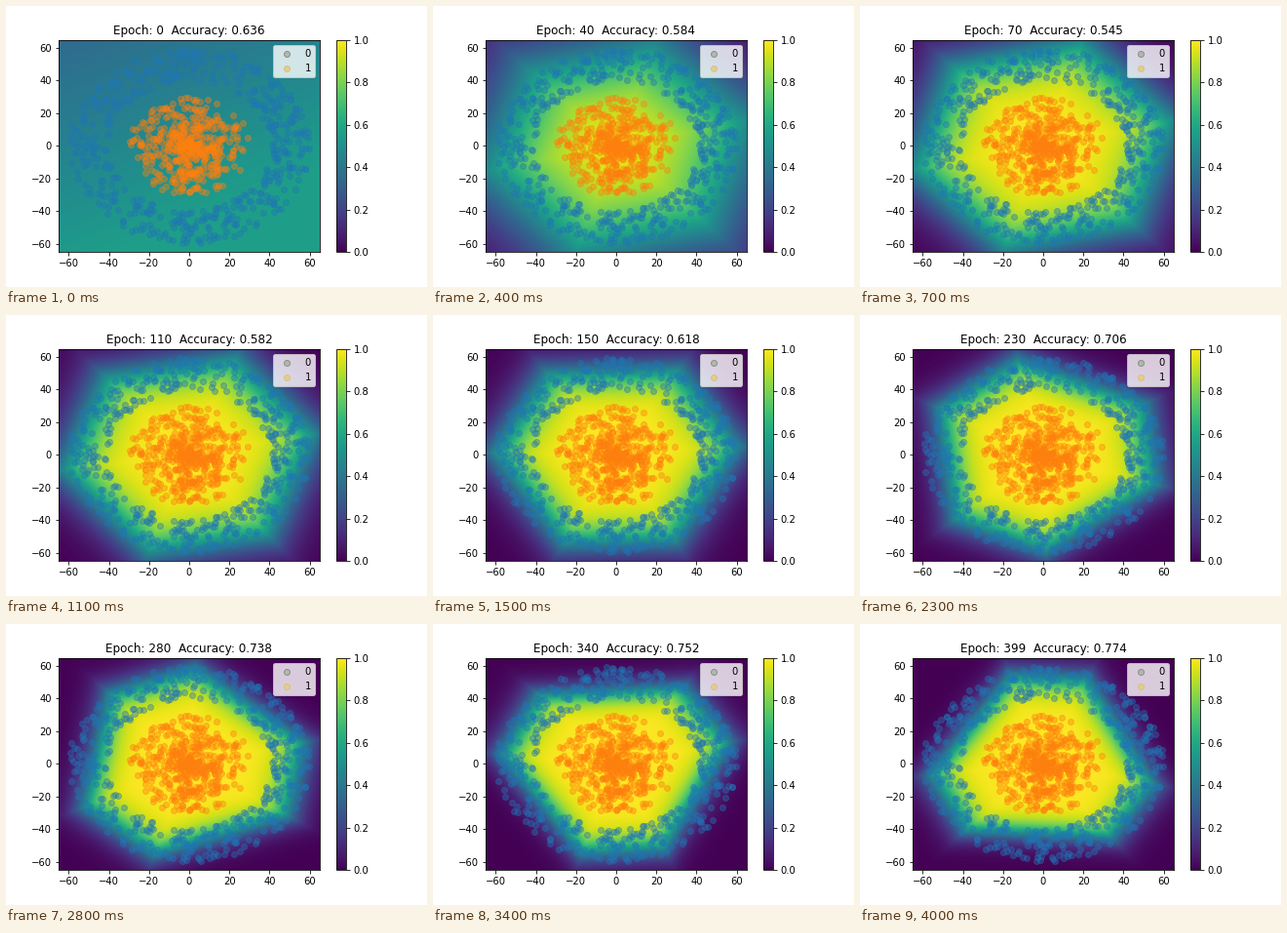
A matplotlib script for the animation above (4100 ms loop, 432 by 288 pixels).

```python
import matplotlib.pyplot as plt
import numpy as np
from matplotlib.animation import FuncAnimation

FRAMES, STEP_MS = 41, 100
LIMIT = 65
FORMED = 7  # step at which the closed boundary has taken shape
BLUE, ORANGE = "#1f77b4", "#ff7f0e"

axis = np.linspace(-LIMIT, LIMIT, 131)
X, Y = np.meshgrid(axis, axis)
START = np.minimum(-0.05 + 0.003 * X - 0.006 * Y, 0.25)


def smoothstep(t):
    t = np.clip(t, 0, 1)
    return t * t * (3 - 2 * t)


def accuracy(i):
    return np.interp(i, (0, 7, 15, 23, 28, 34, 40),
                     (0.636, 0.545, 0.618, 0.706, 0.738, 0.752, 0.774))


def hexagon(i):
    """Corners of the boundary: it turns clockwise, shrinks and skews."""
    turn = 73 - 76 * smoothstep((i - FORMED) / (FRAMES - 1 - FORMED))
    skew = np.interp(i, (7, 28, 34, 40), (0, -7, 9, -10))
    radius = np.interp(i, (7, 15, 40), (66, 60, 56))
    k = np.arange(6)
    angle = np.radians(turn + 60 * k + skew * (-1) ** k)
    return radius * np.column_stack((np.cos(angle), np.sin(angle)))


def gauge(corners):
    """Distance from the centre, scaled to 1 on the polygon."""
    g = np.zeros_like(X)
    for (x0, y0), (x1, y1) in zip(corners, np.roll(corners, -1, axis=0)):
        det = x0 * y1 - y0 * x1
        u = (X * y1 - Y * x1) / det
        v = (x0 * Y - y0 * X) / det
        inside = (u >= -1e-9) & (v >= -1e-9)
        g[inside] = (u + v)[inside]
    return g


def probability(i):
    steepness = np.interp(i, (7, 30), (6.5, 10))
    mix = min(i / FORMED, 1)
    logit = (1 - mix) * START + mix * steepness * (1 - gauge(hexagon(i)))
    return 1 / (1 + np.exp(-logit))


def ring(rng, inner, outer, count=500):
    r = rng.uniform(inner, outer, count)
    phi = rng.uniform(0, 2 * np.pi, count)
    return r * np.cos(phi), r * np.sin(phi)


plt.rcParams["font.family"] = "DejaVu Sans"
fig, ax = plt.subplots(figsize=(6, 4), dpi=72)
fig.subplots_adjust(left=0.125, right=0.9, bottom=0.125, top=0.88)

field = ax.imshow(probability(0), extent=(-LIMIT, LIMIT, -LIMIT, LIMIT),
                  origin="lower", aspect="auto", interpolation="bilinear",
                  cmap="viridis", vmin=0, vmax=1)
fig.colorbar(field, ax=ax, ticks=np.linspace(0, 1, 6))

rng = np.random.default_rng(12)
ax.scatter(*ring(rng, 40, 60), color=BLUE, alpha=0.4, label="0")
ax.scatter(*ring(rng, 0, 30), color=ORANGE, alpha=0.4, label="1")
ticks = range(-60, 61, 20)
ax.set(xlim=(-LIMIT, LIMIT), ylim=(-LIMIT, LIMIT), xticks=ticks, yticks=ticks)

legend = ax.legend(loc="upper right")
for handle, face, edge in zip(legend.legend_handles,
                              ("#b2b8ae", "#e2cc92"), ("#88928a", "#dbc27c")):
    handle.set_alpha(None)
    handle.set_facecolor(face)
    handle.set_edgecolor(edge)
title = ax.set_title("")


def update(i):
    field.set_data(probability(i))
    title.set_text(f"Epoch: {min(10 * i, 399)}  Accuracy: {accuracy(i):.3f}")
    return field, title


anim = FuncAnimation(fig, update, frames=FRAMES, interval=STEP_MS,
                     repeat=True, repeat_delay=0, blit=False)
plt.show()
```
